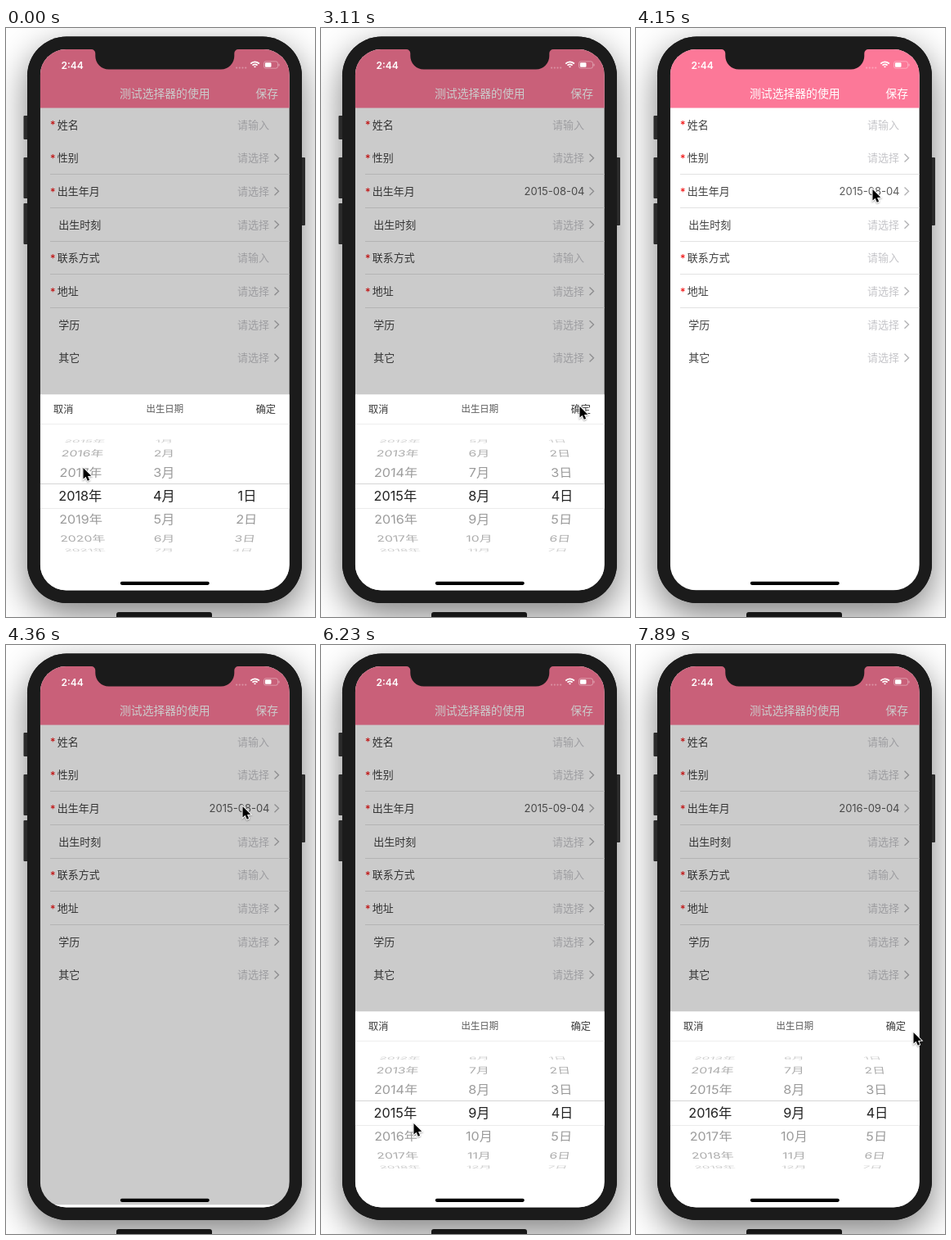
These frames come from a looping animation (378 by 719 pixels, 8000 ms). An HTML page with a canvas:

```html
<!DOCTYPE html>
<html lang="zh-CN">
<head>
<meta charset="utf-8">
<title>日期选择器</title>
<style>
  html, body { margin: 0; width: 100%; height: 100%; overflow: hidden; background: #fff; }
  canvas { display: block; width: 378px; height: 719px; }
</style>
</head>
<body>
<canvas id="stage" width="378" height="719"></canvas>
<script>
const ctx = document.getElementById('stage').getContext('2d');
const LOOP = 8000, STEP = 207.63;
const PT = 0.8133;                         // phone points to pixels
const LEFT = 41.8, TOP = 26, WIDTH = 375 * PT, HEIGHT = 812 * PT;
const RIGHT = LEFT + WIDTH, BOTTOM = TOP + HEIGHT, CENTER = LEFT + WIDTH / 2;
const PANEL_HEIGHT = 294 * PT, PANEL_TOP = BOTTOM - PANEL_HEIGHT;
const HEADER = 44 * PT, WHEEL_Y = PANEL_TOP + HEADER + 108 * PT;
const BODY = '#1b1b1b';
const FONT = '"Inter", "Noto Sans CJK SC", "Noto Sans CJK", sans-serif';

const labels = ['*姓名', '*性别', '*出生年月', '出生时刻', '*联系方式', '*地址', '学历', '其它'];

// Each spin: [start time, end time, rows turned]
const wheels = [
  { x: 90.8, unit: '年', first: 2018, max: 2100, spins: [[100, 830, -3], [6330, 6850, 1]] },
  { x: 193.4, unit: '月', first: 4, max: 12, spins: [[1250, 1650, 4], [5190, 5650, 1]] },
  { x: 295, unit: '日', first: 1, max: 31, spins: [[1970, 2480, 3]] }
];
const COMMIT_DELAY = 200;

// Cursor stops: [time, x, y]
const stops = [
  [0, 94, 537], [830, 97, 618], [1250, 199, 600], [1660, 208, 494], [2080, 284, 592],
  [2490, 291, 512], [2910, 316, 462], [3330, 316, 462], [3900, 289, 197], [4400, 289, 197],
  [4980, 197, 590], [5610, 198, 558], [6230, 113, 584], [6850, 115, 552], [7270, 209, 525],
  [7890, 339, 473]
];

function progress(t, start, end) {
  const u = Math.min(1, Math.max(0, (t - start) / (end - start)));
  return u * u * (3 - 2 * u);
}

const wheelValue = (wheel, t) => wheel.spins.reduce(
  (value, [start, end, turn]) => value + turn * progress(t, start, end), wheel.first);

const committedValue = (wheel, t) => wheel.spins.reduce(
  (value, [, end, turn]) => value + (t > end + COMMIT_DELAY ? turn : 0), wheel.first);

function chosenDate(t) {
  if (t < wheels[0].spins[0][1] + COMMIT_DELAY) return '';
  return wheels.map(w => String(committedValue(w, t)).padStart(2, '0')).join('-');
}

function cursorAt(t) {
  const i = Math.max(1, stops.findIndex(s => s[0] > t));
  const from = t >= stops.at(-1)[0] ? stops.at(-1) : stops[i - 1], to = stops[i];
  const u = progress(t, from[0], to[0]);
  return from === stops.at(-1) ? from.slice(1) : [1, 2].map(k => from[k] + (to[k] - from[k]) * u);
}

// Text centred vertically on y, size in points
function text(str, x, y, size, color, align = 'left', weight = 400) {
  ctx.font = `${weight} ${size * PT}px ${FONT}`;
  ctx.textAlign = align;
  ctx.fillStyle = color;
  ctx.fillText(str, x, y + size * PT * 0.37);
}

function rect(x, y, w, h, color) {
  ctx.fillStyle = color;
  ctx.fillRect(x, y, w, h);
}

function round(x, y, w, h, r, color) {
  ctx.beginPath();
  ctx.roundRect(x, y, w, h, r);
  ctx.fillStyle = color;
  ctx.fill();
}

function drawBody() {
  ctx.save();
  ctx.shadowColor = 'rgba(0,0,0,.5)';
  ctx.shadowBlur = 44;
  ctx.shadowOffsetY = 15;
  round(26, 10.5, 336, 691.5, 48, BODY);
  ctx.restore();
  const button = (x, y, h) => round(x, y, 6, h, 1, '#2b2b2b');
  button(21.5, 107, 29);
  button(21.5, 158, 50);
  button(21.5, 214, 50);
  button(360, 158, 83);
  round(26, 10.5, 336, 691.5, 48, BODY);
  round(135, 713, 117, 12, 3, '#161616');
}

function drawForm(t) {
  rect(LEFT, TOP, WIDTH, HEIGHT, '#fff');
  rect(LEFT, TOP, WIDTH, 88 * PT, '#fc7898');
  text('测试选择器的使用', CENTER, 80, 17, '#fff', 'center', 500);
  text('保存', 333, 80, 17, '#fff', 'right');
  const pitch = 50 * PT, date = chosenDate(t);
  labels.forEach((label, i) => {
    const y = 118 + i * pitch, required = label[0] === '*', typed = i % 4 === 0;
    if (required) text('*', 54, y + 0.5, 16, '#f00808');
    text(label.replace('*', ''), required ? 62.8 : 64.2, y, 16, '#404040');
    if (i === 2 && date) text(date, 322.5, y, 16, '#5c5c5c', 'right');
    else text(typed ? '请输入' : '请选择', 322, y, 16, '#c6c6ca', 'right');
    if (!typed) {
      ctx.beginPath();
      for (const k of [-1, 0, 1]) ctx.lineTo(333.5 - 5 * Math.abs(k), y + 4.8 * k);
      ctx.strokeStyle = '#b4b4b6';
      ctx.lineWidth = 1.4;
      ctx.stroke();
    }
    if (i > 0 && i < 6) rect(54, Math.floor(y + pitch / 2), RIGHT - 54, 1, '#e2e2e2');
  });
}

// Rows sit on a cylinder seen in slight perspective
function drawWheel(wheel, t, selected) {
  const RADIUS = 69.5, ANGLE = 0.4224, DISTANCE = 830;
  const value = wheelValue(wheel, t), dx = wheel.x - CENTER;
  for (let n = Math.round(value) - 4; n <= Math.round(value) + 4; n++) {
    const phi = (n - value) * ANGLE;
    if (n < 1 || n > wheel.max || Math.abs(phi) > 1.42) continue;
    const cos = Math.cos(phi), sin = Math.sin(phi);
    const scale = DISTANCE / (DISTANCE + RADIUS * (1 - cos));
    const alpha = selected ? 0.87 : 0.42 * cos ** 0.6;
    ctx.save();
    ctx.transform(scale, 0, -dx * sin / DISTANCE, cos * scale,
      CENTER + dx * scale, WHEEL_Y + RADIUS * sin);
    text(n + wheel.unit, 0, 0, 20, `rgba(0,0,0,${alpha})`, 'center');
    ctx.restore();
  }
}

function drawPanel(t, offset) {
  ctx.save();
  ctx.translate(0, offset);
  rect(LEFT, PANEL_TOP, WIDTH, PANEL_HEIGHT + 1, '#fff');
  const titleY = PANEL_TOP + HEADER / 2;
  text('取消', 58, titleY, 15, '#3a3a3a');
  text('出生日期', CENTER, titleY, 14, '#5a5a5a', 'center');
  text('确定', 330, titleY, 15, '#3a3a3a', 'right');
  rect(LEFT, 483, WIDTH, 1, '#eee');
  wheels.forEach(w => drawWheel(w, t, false));
  rect(LEFT, 557, WIDTH, 29, '#fff');
  ctx.save();
  ctx.beginPath();
  ctx.rect(LEFT, 557, WIDTH, 29);
  ctx.clip();
  wheels.forEach(w => drawWheel(w, t, true));
  ctx.restore();
  rect(LEFT, 556, WIDTH, 1, '#d6d6d6');
  rect(LEFT, 586, WIDTH, 1, '#ebebeb');
  ctx.restore();
}

function drawStatusBar() {
  const faint = 'rgba(255,255,255,.4)';
  text('2:44', 67.5, 45.2, 14.8, '#fff', 'left', 600);
  for (let i = 0; i < 4; i++) round(281 + i * 3.7, 47.5, 2.2, 2.2, 1.1, 'rgba(255,255,255,.3)');
  ctx.strokeStyle = '#fff';
  ctx.lineWidth = 1.8;
  for (let r = 1.2; r < 8; r += 3) {
    ctx.beginPath();
    ctx.arc(304.5, 48.5, r, -Math.PI * 0.76, -Math.PI * 0.24);
    ctx.stroke();
  }
  ctx.beginPath();
  ctx.roundRect(315.5, 40.8, 17, 8.4, 2.4);
  ctx.strokeStyle = faint;
  ctx.lineWidth = 0.9;
  ctx.stroke();
  round(333.4, 43.5, 1.2, 3, 0.6, faint);
  round(316.9, 42.2, 7.6, 5.6, 1.2, '#fff');
}

function drawNotch() {
  const half = 104.5 * PT, bottom = TOP + 30 * PT, lip = 6 * PT;
  const left = CENTER - half, right = CENTER + half;
  ctx.beginPath();
  ctx.moveTo(left - lip, TOP - 1);
  ctx.arcTo(left - lip, TOP, left, TOP, 0);
  ctx.arcTo(left, TOP, left, bottom, lip);
  ctx.arcTo(left, bottom, CENTER, bottom, 20 * PT);
  ctx.arcTo(right, bottom, right, TOP, 20 * PT);
  ctx.arcTo(right, TOP, right + lip, TOP, lip);
  ctx.lineTo(right + lip, TOP - 1);
  ctx.fillStyle = BODY;
  ctx.fill();
}

function drawCursor(x, y) {
  ctx.save();
  ctx.translate(x + 0.5, y);
  const arrow = new Path2D('M0 0V13.6L3.1 10.8 5.3 15.8 7.6 14.8 5.5 10 9.8 9.8Z');
  ctx.shadowColor = 'rgba(0,0,0,.35)';
  ctx.shadowBlur = 2;
  ctx.shadowOffsetY = 1;
  ctx.strokeStyle = '#fff';
  ctx.lineWidth = 1.8;
  ctx.stroke(arrow);
  ctx.shadowColor = 'transparent';
  ctx.fillStyle = '#000';
  ctx.fill(arrow);
  ctx.restore();
}

function draw(t) {
  rect(0, 0, 378, 719, '#fff');
  drawBody();
  ctx.save();
  ctx.beginPath();
  ctx.roundRect(LEFT, TOP, WIDTH, HEIGHT, 39 * PT);
  ctx.clip();
  drawForm(t);
  if (t < 3700 || t > 4250) rect(LEFT, TOP, WIDTH, HEIGHT, 'rgba(0,0,0,.204)');
  const open = 1 - progress(t, 3220, 3500) + progress(t, 4340, 4640);
  if (open > 0) drawPanel(t, (1 - open) * PANEL_HEIGHT);
  drawStatusBar();
  round(CENTER - 67 * PT, BOTTOM - 13 * PT, 134 * PT, 5 * PT, 2.5 * PT, '#000');
  ctx.restore();
  drawNotch();
  drawCursor(...cursorAt(t));
}

function tick() {
  const now = performance.now() % LOOP;
  draw(Math.floor((now + 8) / STEP) * STEP);
  requestAnimationFrame(tick);
}
tick();
</script>
</body>
</html>
```
